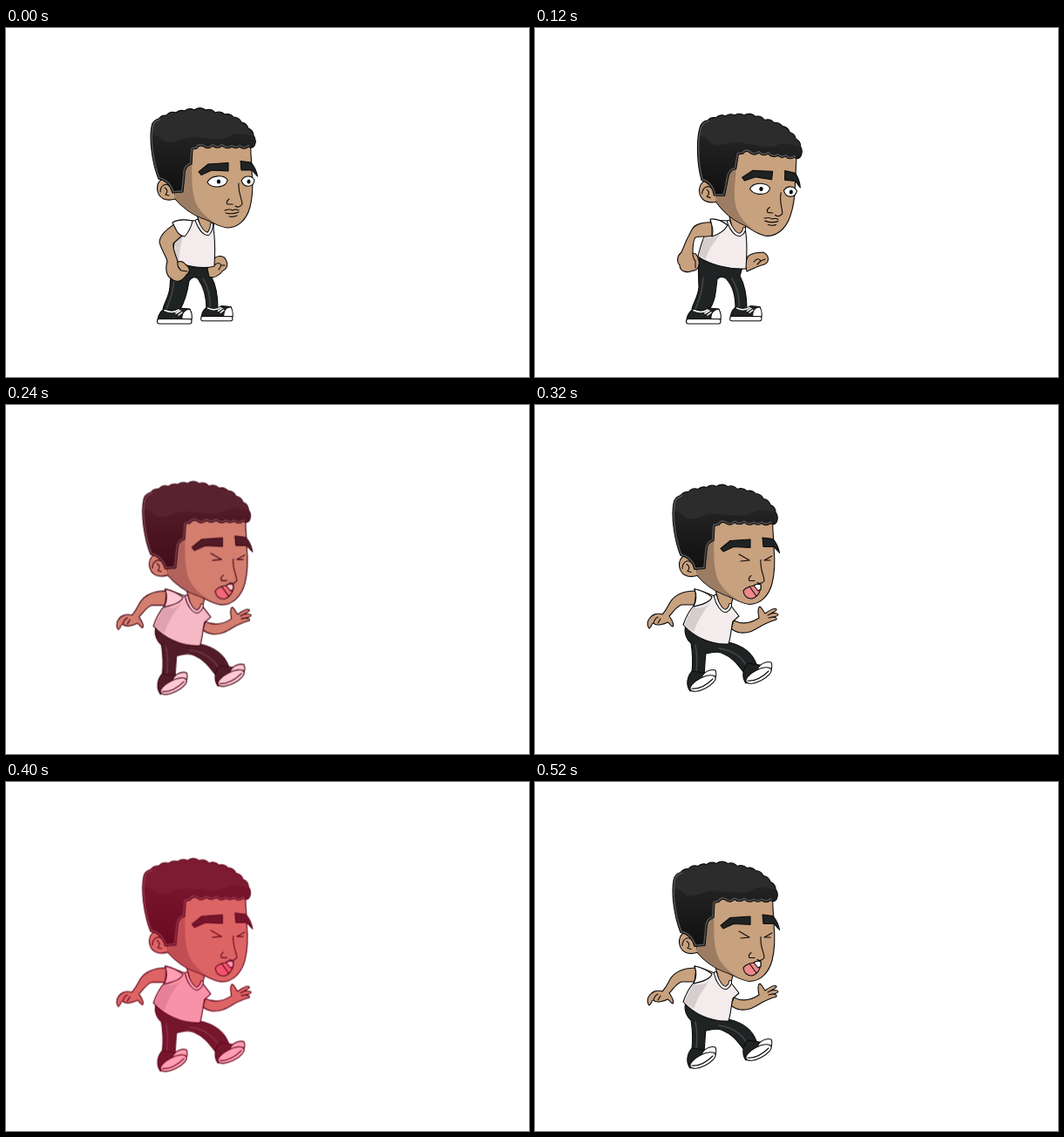
These frames come from a looping animation (600x400 px, 560 ms). An HTML page without scripts:

```html
<!DOCTYPE html>
<html lang="en">
<head>
<meta charset="utf-8">
<title>Cartoon hit reaction</title>
<style>
  html, body { margin: 0; width: 100%; height: 100%; overflow: hidden; background: #fff; }
  svg { display: block; width: 100%; height: 100%; }
  path, ellipse, rect { stroke: #0b0b0b; stroke-width: 1.1; stroke-linejoin: round; stroke-linecap: round; }
  .flat { stroke: none; }
  .skin { fill: #c8a17e; }
  .shade { fill: #9c7d63; stroke: none; }
  .dark { fill: #202323; }
  .shirt { fill: #f4ecec; }
  .fold { fill: #d6cece; stroke: none; }
  .white { fill: #fff; }
  .line { fill: none; }
  .sheen { fill: none; stroke: #414646; stroke-width: 1.6; }
  .band { fill: none; stroke-width: 4.2; }
  .band + .band { stroke: #fff; stroke-width: 2.2; }
  .rim { fill: none; stroke: #555; stroke-width: 4; }
  .pulse { transform-origin: 204px 210px; }

  .morph { animation: morph 560ms steps(3) infinite; }
  .ready { animation: ready 560ms step-end infinite; }
  .hurt { animation: hurt 560ms step-end infinite; }

  @keyframes morph { 21.42%, 100% { d: var(--to); } }
  @keyframes ready { 0% { visibility: visible; } 28.57%, 100% { visibility: hidden; } }
  @keyframes hurt {
    0% { visibility: hidden; filter: none; }
    28.57% { visibility: visible; filter: none; }
    42.85% { visibility: visible; filter: url(#flush); }
    57.14% { visibility: visible; filter: none; }
    71.42% { visibility: visible; filter: url(#blush); }
    85.71%, 100% { visibility: visible; filter: none; }
  }
</style>
</head>
<body>
<svg viewBox="0 0 600 400" role="img" aria-label="Cartoon boy recoiling from a hit">
  <defs>
    <filter id="flush" filterUnits="userSpaceOnUse" x="0" y="0" width="600" height="400" color-interpolation-filters="sRGB">
      <feColorMatrix values=".78 0 0 0 .22  0 .78 0 0 0  0 0 .78 0 .05  0 0 0 1 0"/>
    </filter>
    <filter id="blush" filterUnits="userSpaceOnUse" x="0" y="0" width="600" height="400" color-interpolation-filters="sRGB">
      <feColorMatrix values=".62 0 0 0 .38  0 .62 0 0 0  0 0 .62 0 .09  0 0 0 1 0"/>
    </filter>
    <linearGradient id="hairFade" x1="0" y1="0" x2="0" y2="1">
      <stop offset="0" stop-color="#232323"/><stop offset="1" stop-color="#0f0f0f"/>
    </linearGradient>

    <path id="hair" d="M175 173 C168 156 164 128 167 113 Q168 106 175 104 A10 10 0 0 1 184 100 A10 10 0 0 1 195 97 A10 10 0 0 1 205 95 A10 10 0 0 1 216 94 A10 10 0 0 1 229 94 A10 10 0 0 1 240 97 A10 10 0 0 1 251 99 A10 10 0 0 1 261 102 A10 10 0 0 1 270 108 A10 10 0 0 1 278 115 A9 9 0 0 1 284 123 Q288 129 285 135 Q282 139 278 136 A7 7 0 0 1 268 136 A7 7 0 0 1 259 136 A8 8 0 0 1 248 135 A8 8 0 0 1 237 135 A7 7 0 0 1 227 136 Q222 133 219 138 L214 139 L213 156 Q205 158 205 168 L203 188 L191 189 Q187 175 175 173Z"/>
    <clipPath id="hairClip"><use href="#hair"/></clipPath>

    <g id="head">
      <path class="skin" d="M200 135 L281 134 C280 142 282 150 282 164 C284 184 282 197 280 205 C276 220 266 229 254 229 C243 228 235 221 225 218 C211 213 200 203 193 195Z"/>
      <path class="shade" d="M204 150 L214 141 C213 165 212 187 218 201 C224 213 233 219 241 224 C233 220 229 219 225 217.500 C211 212 201 203 194 195Z"/>
      <path class="skin" d="M192 176 C181 168 173 175 173.500 185 C175 196 184 199 194 196"/>
      <path class="line" d="M189 182 C183 176 177 181 177 188 M182 183 Q187 186 183 191 L187 192"/>
      <g clip-path="url(#hairClip)">
        <path class="flat" fill="#2c2c2c" d="M160 88H292V192H160Z"/>
        <path class="flat" fill="url(#hairFade)" d="M160 124 Q172 120 178 127 T197 129 T216 125 T238 127 T259 123 T292 126 V192 H160Z"/>
        <path class="rim" d="M175 173 C168 156 164 128 167 113 Q168 106 175 104 M278 136 A7 7 0 0 1 268 136 A7 7 0 0 1 259 136 A8 8 0 0 1 248 135 A8 8 0 0 1 237 135 A7 7 0 0 1 227 136 Q222 133 219 138 L214 139 L213 156 Q205 158 205 168 L203 188 L191 189 Q187 175 175 173"/>
      </g>
      <use href="#hair" fill="none"/>
      <path class="dark" d="M221 165 L232 156 L255 154.500 L255 164 L236 163 L224 168.500Z"/>
      <path class="dark" d="M269 152.500 L281 154 Q287 161 288.500 170 L282 163 L270 163Z"/>
      <path class="line" d="M267 178 C266 190 271 196 271 202 Q267 207 263 204 M256 196 Q252 199 254 202 L260 202"/>
    </g>

    <g id="shoe">
      <path class="dark" d="M174 334 C175 328 178 324 182 322 Q191 327 199 321 L211 322 L213 334Z"/>
      <path class="white" d="M202 334 C201 326 206 322 211 322.500 Q214 327 213 334Z"/>
      <path class="line" style="stroke:#fff;stroke-width:1.500" d="M195 327 L200 324 M198 329 L202 326 M182 323.500 Q191 327.500 198 323"/>
      <rect class="white" x="173.500" y="333.500" width="39.500" height="5.500" rx="2.500"/>
    </g>

    <g id="kickShoe">
      <path class="dark" d="M180 305 C174 312 173 321 178 328 L199 312 L194 307Z"/>
      <path class="white" d="M191 313 C193 306 201 302 207 304 Q209 309 206 315Z"/>
      <ellipse class="white" cx="192.500" cy="319" rx="16" ry="6.500" transform="rotate(-27 192.500 319)"/>
      <path class="line" d="M180 325 Q192 326 204 314"/>
    </g>
  </defs>

  <g class="ready">
    <path class="dark morph" d="M194 268 C190 280 188 288 188 297 C187 308 182 314 180 322 C186 327 193 326 199 324 C205 314 208 304 210 290 C213 285 216 285 220 287 C227 297 230 308 230 322 C235 325 239 324 243 322 C243 308 241 295 236 286 L239 272 Z"
      style="--to:path('M189 260 C186 270 188 290 188 297 C187 308 182 314 180 322 C186 327 193 326 199 324 C207 314 207 304 209 288 C212 284 216 285 219 287 C228 297 230 308 230 322 C235 325 239 324 243 322 C243 308 241 295 235 284 L238 274 Z')"/>
    <path class="sheen" d="M193 286 C192 303 188 312 184 322 M226 287 Q235 302 234 321"/>
    <use href="#shoe"/>
    <use href="#shoe" transform="translate(64 12) scale(.92 .955)"/>

    <path class="skin morph" d="M239 264 C243 260 250 261 252 265 C255 270 254 276 249 278 C246 282 239 288 233 285 L231 276 Z"
      style="--to:path('M244 262 C250 256 258 258 262 257 C268 260 270 268 263 271 C254 273 249 277 243 279 L241 270 Z')"/>
    <path class="line morph" d="M239 272 Q244 267 247 272 L244 277 M247 272 L251 272"
      style="--to:path('M251 268 Q256 262 259 267 L255 271 M259 267 L264 265')"/>
    <path class="skin morph" d="M219 214 L240 216 L237 234 L225 234Z" style="--to:path('M223 216 L243 220 L240 238 L228 236Z')"/>
    <path class="shirt morph" d="M200 220 L219 221 C222 229 227 236 232 237 C235 233 236 229 237 224 C240 238 240 256 239 273 C225 277 204 273 193 266 C191 252 193 240 200 220 Z"
      style="--to:path('M202 220 L222 221 C225 230 230 237 235 238 C239 235 240 232 241 230 C244 244 243 262 242 276 C222 277 200 271 187 262 C189 252 193 240 202 220 Z')"/>
    <path class="fold morph" d="M194 240 C198 240 201 239 204 237 C200 248 198 259 199 268 L194 265 Z"
      style="--to:path('M194 240 C202 241 208 240 213 236 C206 245 199 253 196 265 L188 261 Z')"/>
    <path class="band morph" d="M219 221 C222 229 227 236 232 236 Q236 231 236 225" style="--to:path('M222 222 C225 230 230 237 235 237 Q240 234 240 230')"/>
    <path class="band morph" d="M219 221 C222 229 227 236 232 236 Q236 231 236 225" style="--to:path('M222 222 C225 230 230 237 235 237 Q240 234 240 230')"/>

    <path class="skin morph" d="M194 224 C186 230 177 236 176 245 C177 252 183 260 185 267 C183 274 183 283 189 287 C196 294 203 289 207 283 C212 280 211 274 206 271 C203 267 199 267 197 268 C195 260 191 254 192 247 C196 243 200 240 203 237 Z"
      style="--to:path('M203 223 C193 222 183 225 180 231 C175 240 171 249 168 257 C163 261 162 268 166 272 C166 280 176 281 181 278 C187 279 190 270 187 264 C186 259 183 258 181 258 C181 252 181 244 184 240 C190 238 197 240 203 238 Z')"/>
    <path class="line morph" d="M197 268 Q196 274 201 278 L208 279" style="--to:path('M181 258 Q181 264 184 267 L184 275')"/>
    <path class="white morph" d="M191 223 Q199 218 214 221 Q212 231 205 239 Q199 238 196 233 Z"
      style="--to:path('M201 219 Q211 218 221 226 Q216 235 203 239 Q205 232 203 227 Z')"/>

    <g>
      <animateTransform attributeName="transform" type="rotate" dur="560ms" repeatCount="indefinite" calcMode="discrete"
        keyTimes="0;.0714;.1428;.2142" values="0 168 333;1.93 168 333;3.87 168 333;5.8 168 333"/>
      <use href="#head"/>
      <path class="white" d="M231 177 C235 168 250 168 254 174 C253 183 237 185 231 177Z M270 175 C274 168 282 169 285 174 C284 183 273 184 270 175Z"/>
      <ellipse cx="244" cy="176" rx="1.700" ry="2"/>
      <ellipse cx="278.500" cy="176" rx="1.500" ry="2"/>
      <path class="line" d="M251 209 Q257 207 260 209 Q264 207 267 209 M252 212 Q260 214 267 211 M256 216 Q261 217 265 215"/>
    </g>
  </g>

  <g class="hurt">
    <g class="pulse">
      <animateTransform attributeName="transform" type="scale" dur="560ms" repeatCount="indefinite" calcMode="discrete"
        keyTimes="0;.3571;.5714;.6428;.9285" values="1;1.03;1;1.03;1"/>
      <path class="dark" d="M173 252 C170 262 175 270 179 273 C181 285 181 297 180 307 L194 309 C195 300 195 291 196 285 C202 284 210 281 216 285 C228 290 234 300 240 307 L254 297 C250 286 240 276 222 272Z"/>
      <path class="sheen" d="M184 275 Q187 290 185 305 M211 279 Q234 282 244 301"/>
      <use href="#kickShoe"/>
      <use href="#kickShoe" transform="translate(64 -9)"/>

      <path class="skin" d="M228 247 C238 252 248 250 257 244 C256 239 255 232 258 231 C261 233 262 237 264 239 C268 236 274 232 277 234 C278 236 272 238 271 239 C275 238 279 239 279 240 C279 242 274 243 272 243 C275 243 278 244 277 246 C273 247 270 248 266 250 C256 254 250 262 236 261 Q229 260 225 256Z"/>
      <path class="line" d="M271 239 L267 241 M272 243 L268 244"/>
      <path class="skin" d="M185 213 C170 213 160 218 155 226 C152 232 150 236 146 240 C140 238 134 240 131 245 C128 249 129 254 131 256 C134 255 133 250 136 250 C139 254 149 251 152 249 C155 250 156 254 158 254 C160 252 157 246 154 242 C159 237 162 231 168 229 L183 229Z"/>
      <path class="line" d="M136 250 Q137 245 141 243 M141 250 L144 245"/>
      <path class="skin" d="M207 212 L228 216 L224 235 L213 235Z"/>
      <path class="shirt" d="M183 211 C192 213 200 217 206 219 C209 229 215 237 220 237 Q224 233 224 229 L234 242 L227 248 C225 256 225 264 222 274 C200 275 182 265 170 252 C173 243 177 236 182 230 Q187 221 183 211Z"/>
      <path class="fold" d="M182 231 Q192 235 201 227 Q188 243 182 260 L171 252Z"/>
      <path class="white" d="M183 211 Q194 213 203 220 Q201 227 182 231 Q187 221 183 211Z"/>
      <path class="band" d="M207 219 C209 229 215 236 219 236 Q224 233 224 229"/>
      <path class="band" d="M207 219 C209 229 215 236 219 236 Q224 233 224 229"/>

      <use href="#head" transform="translate(-8 -.5)"/>
      <path class="line" d="M234 171 L246 178 L236 179 M272 173 L263 178 L270 178"/>
      <path fill="#ef878b" d="M239 213 C241 209 246 208 251 207 Q255 204 259 206 C260 212 256 220 249 222 Q240 222 239 213Z"/>
      <path class="line" d="M246 208 L254 219"/>
      <path class="white" d="M251 207 Q255 204 259 206 L259 211 L256 213Z"/>
    </g>
  </g>
</svg>
</body>
</html>
```
